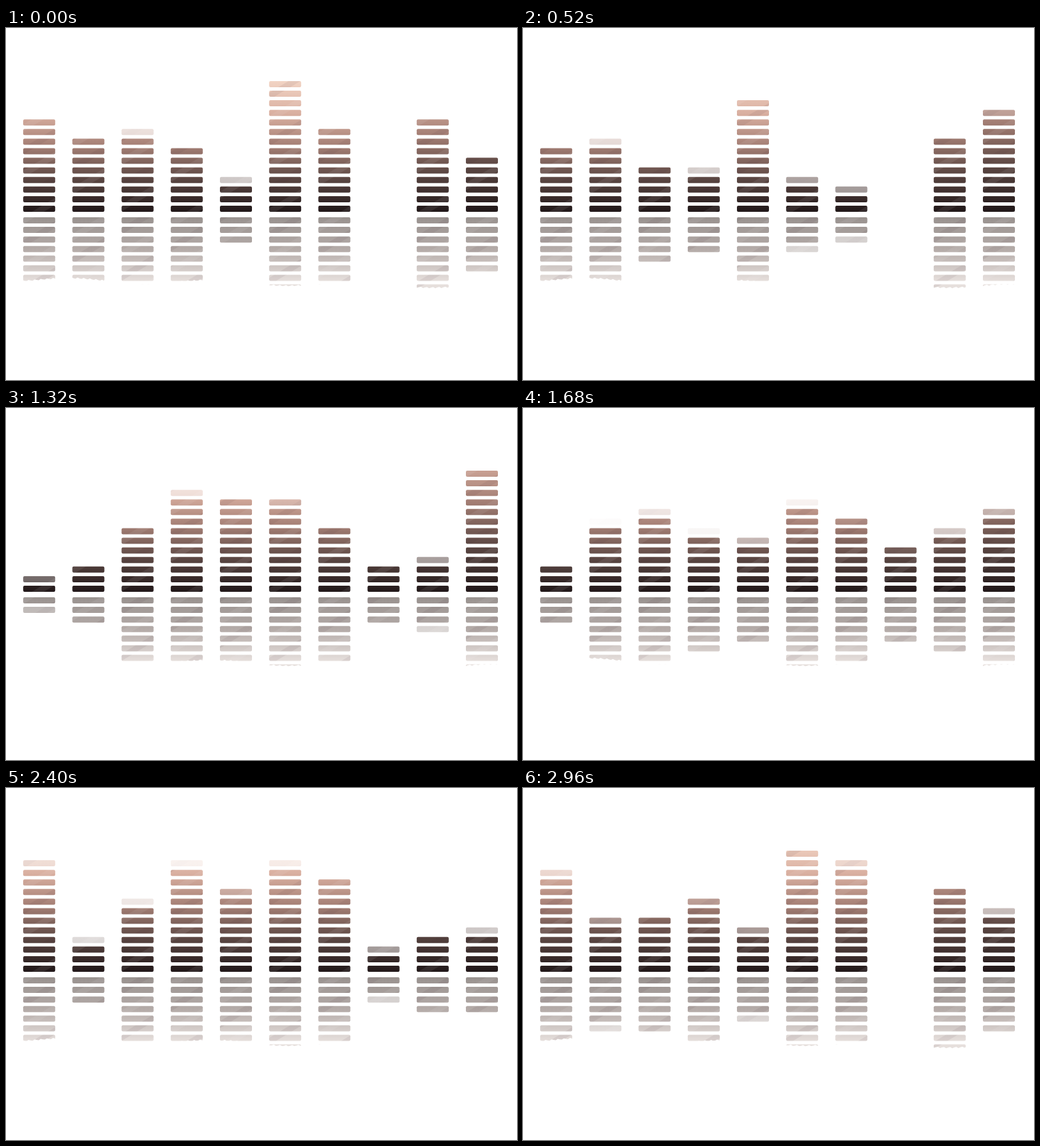
Recreate the animation shown at these times as an HTML page with a canvas. Size 750x517 px, loop 3000 ms.

```html
<!DOCTYPE html>
<html>
<head>
<meta charset="utf-8">
<style>
html, body { margin: 0; width: 100%; height: 100%; overflow: hidden; background: #fff; }
canvas { display: block; }
</style>
</head>
<body>
<canvas id="stage" width="750" height="517"></canvas>
<script>
const ctx = document.getElementById('stage').getContext('2d');
const LOOP = 3000, STEP = 40, COLUMNS = 10, PITCH = 14.08;

// Key poses: the level of each column, in bars.
const poses = [
  { at: 0, levels: [10, 8, 8.3, 7, 3.3, 14, 9, 0, 10, 6] },
  { at: 520, levels: [7, 7.3, 5, 4.3, 12, 3.5, 2.5, 0, 8, 10.8] },
  { at: 880, levels: [12.4, 9, 6, 6.5, 2.5, 6.8, 6, 7.7, 7.7, 10.8] },
  { at: 1320, levels: [1.7, 3, 7, 10.4, 10, 9.8, 7, 3, 3.5, 13] },
  { at: 2000, levels: [4.3, 11, 10, 3, 2.2, 9.4, 9.4, 7, 9.3, 5.6] },
  { at: 2400, levels: [11.5, 3.2, 7.2, 11.2, 8.8, 11.3, 10, 2.5, 4, 4.3] },
  { at: 2960, levels: [10.5, 5.7, 6, 7.8, 4.6, 13, 11.6, 0, 9, 6.4] }
];

function gradient(y0, y1, colors) {
  const g = ctx.createLinearGradient(0, y0, 0, y1);
  colors.forEach((c, i) => g.addColorStop(i / (colors.length - 1), c));
  return g;
}

// The last columns stay dark further up.
const tones = Array.from({ length: COLUMNS }, (_, col) =>
  gradient(270, 78 - 8 * Math.max(0, col - 6) ** 2,
    ['#211819', '#5a4642', '#a37e74', '#d9af a0'.replace(' ', ''), '#f2d4c4']));
const mirrorTone = gradient(278, 372, ['#99928f', '#b4aba8', '#e6dfdc']);

function levelsAt(t) {
  const i = poses.findLastIndex(p => p.at <= t);
  const a = poses[i], b = poses[(i + 1) % poses.length];
  const u = (t - a.at) / ((b.at || LOOP) - a.at);
  const ease = (1 - Math.cos(Math.PI * u)) / 2;
  const bounce = 1 + (i % 2 ? .25 : -.25) * Math.sin(2 * Math.PI * u);
  return a.levels.map((v, col) => (v + (b.levels[col] - v) * ease) * bounce);
}

function bar(x, y, fill, alpha) {
  ctx.globalAlpha = alpha;
  ctx.fillStyle = fill;
  ctx.beginPath();
  ctx.roundRect(x, y, 47, 9, 2);
  ctx.fill();
}

function column(level, col) {
  const x = 25.2 + 72.2 * col;
  for (let k = 0; k < level; k++) {
    const alpha = Math.min(1, level - k);
    bar(x, 261 - PITCH * k, tones[col], alpha);
    // Faint bars drop out of the reflection, sooner the deeper they lie.
    if (k < 8 && alpha > .2 + .08 * k) bar(x, 278 + PITCH * k, mirrorTone, alpha);
  }
}

// Soft diagonal folds, painted only onto the bars.
function folds() {
  ctx.globalCompositeOperation = 'source-atop';
  ctx.globalAlpha = .07;
  ctx.lineWidth = 9;
  for (let i = 0; i < 24; i++) {
    ctx.strokeStyle = i % 2 ? '#fff' : '#40202a';
    ctx.beginPath();
    ctx.moveTo(0, 60 + i * 34);
    ctx.lineTo(750, 60 + i * 34 - 450);
    ctx.stroke();
  }
  ctx.globalCompositeOperation = 'source-over';
}

// The reflection ends in a ragged, wavy line.
function raggedEdge() {
  ctx.globalAlpha = 1;
  ctx.fillStyle = '#fff';
  ctx.beginPath();
  ctx.moveTo(0, 517);
  for (let x = 0; x <= 750; x += 3) {
    const wave = 3.5 * Math.cos((x - 410) / 210 * 2 * Math.PI);
    ctx.lineTo(x, 369.5 + x / 75 + wave + Math.sin(x * .7));
  }
  ctx.lineTo(750, 517);
  ctx.fill();
}

function draw(t) {
  ctx.clearRect(0, 0, 750, 517);
  levelsAt(t).forEach(column);
  folds();
  raggedEdge();
}

const start = performance.now();
function tick() {
  const t = (performance.now() - start) % LOOP;
  draw(Math.floor(t / STEP) * STEP);
  requestAnimationFrame(tick);
}
tick();
</script>
</body>
</html>
```
